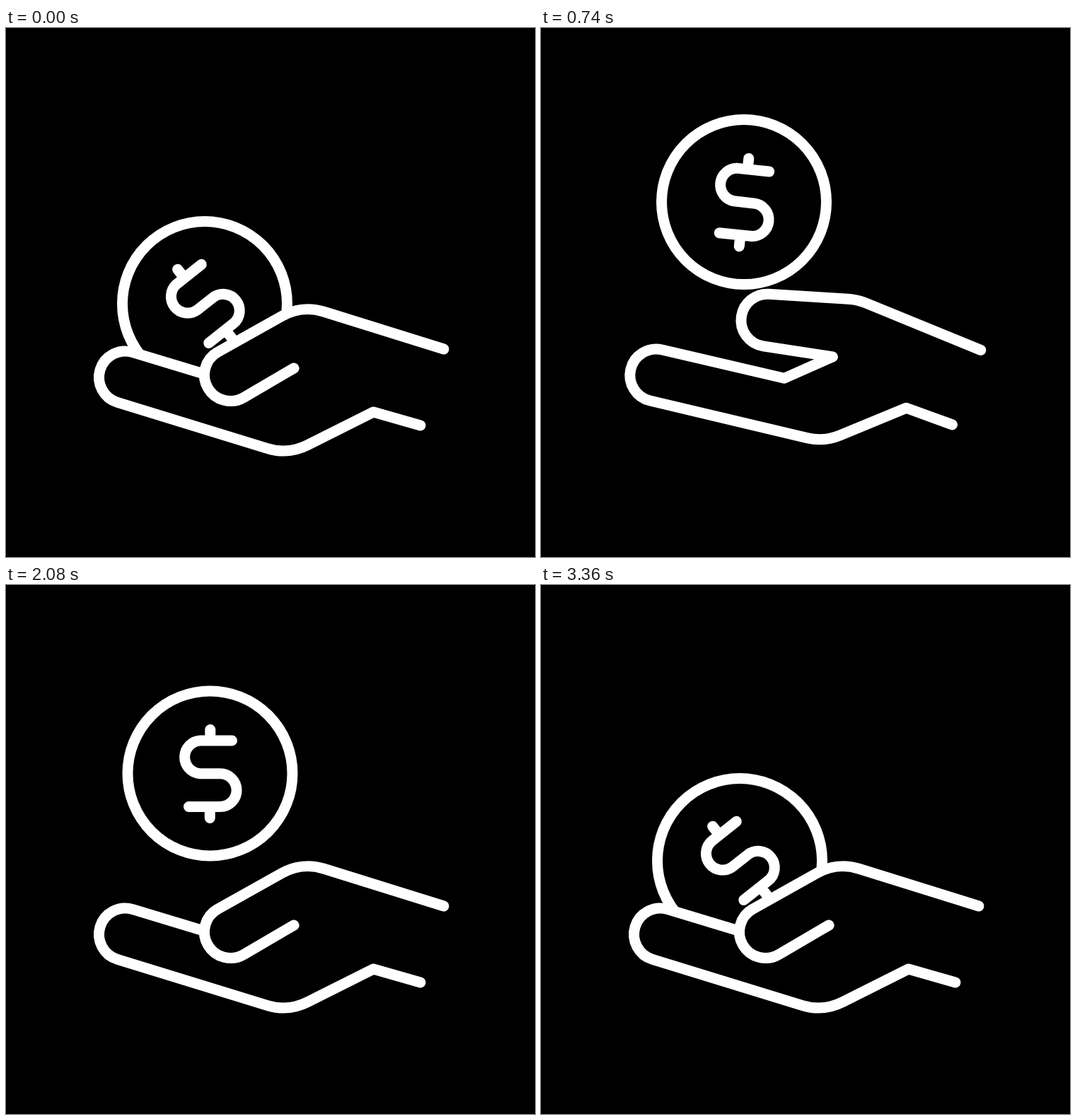
An HTML page with a canvas for the animation above (3580 ms loop, 748 by 748 pixels).

```html
<!DOCTYPE html>
<html>
<head>
<meta charset="utf-8">
<style>
  html, body { margin: 0; height: 100%; overflow: hidden; background: #000; }
  canvas { display: block; }
</style>
</head>
<body>
<canvas id="stage" width="748" height="748"></canvas>
<script>
const ctx = document.getElementById('stage').getContext('2d');
const LOOP = 3580, FINGER = 37, BEND = 76;
const dollar = new Path2D('M31-46.5H-14A23.4 23.4 0 0 0-14 .2L14.3 .4A23.3 23.3 0 0 1 14.3 47H-30M.3-62V-46.5M-.2 47V63');

// Progress from 0 to 1 between two times: a cubic Bezier easing with flat ends
function ease(t, from, to, x1 = 1 / 3, x2 = 2 / 3) {
  const p = Math.min(1, Math.max(0, (t - from) / (to - from)));
  let lo = 0, hi = 1, s;
  for (let i = 0; i < 24; i++) {
    s = (lo + hi) / 2;
    const x = 3 * (1 - s) * s * ((1 - s) * x1 + s * x2) + s ** 3;
    if (x < p) lo = s; else hi = s;
  }
  return s * s * (3 - 2 * s);
}

// Rises to 1 between a and b, falls back between c and d
const pulse = (t, a, b, c, d) => ease(t, a, b) - ease(t, c, d);

function rotate([x, y], [px, py], angle, scale = 1) {
  const c = Math.cos(angle) * scale, s = Math.sin(angle) * scale;
  return [px + (x - px) * c - (y - py) * s, py + (x - px) * s + (y - py) * c];
}

// Arc around c, tangent to the lines from one point and to another
function hook(c, from, to, dir) {
  const angle = (p, side) => {
    const dx = p[0] - c[0], dy = p[1] - c[1];
    return Math.atan2(dy, dx) + side * Math.acos(FINGER / Math.hypot(dx, dy));
  };
  ctx.arc(...c, FINGER, angle(from, dir), angle(to, -dir), dir < 0);
}

function drawCoin(t) {
  const toss = ease(t, 0, 700);
  const settle = ease(t, 700, 2170, .28, .13);
  const drop = ease(t, 2185, 3240, .985, .55);
  const turn = 44.5 * toss - 6 * settle - 38.5 * drop - 38.5;
  ctx.save();
  ctx.translate(281 + 6 * toss + 1.5 * settle - 7.5 * drop,
    390 - 144 * toss + 20.5 * settle + 123.5 * drop);
  ctx.beginPath();
  ctx.arc(0, 0, 116.5, 0, 2 * Math.PI);
  ctx.stroke();
  ctx.rotate(turn * Math.PI / 180);
  ctx.stroke(dollar);
  ctx.restore();
}

function drawHand(t) {
  // The whole hand tilts at the wrist; fingers curl and the thumb swings on top of that
  const tilt = .07 * pulse(t, 140, 460, 740, 1250) - .0128 * pulse(t, 0, 140, 140, 460)
    + .0232 * pulse(t, 2600, 2780, 2780, 3120) - .0104 * pulse(t, 2780, 3120, 3120, 3360);
  const curl = .135 * pulse(t, 160, 560, 740, 1250);
  const swing = .537 * pulse(t, 120, 540, 740, 1250);

  const arm = (x, y) => rotate([x, y], [600, 497], tilt);
  const palm = (x, y) => arm(...rotate([x, y], [370, 545], -curl));
  const thumb = (x, y, share = 1, stretch = 0) =>
    arm(...rotate([x, y], [414, 486], swing * share, 1 + stretch * swing ** 2));

  const tip = thumb(407, 481), pad = thumb(317.5, 490.5, 1, .57);
  const knuckle = thumb(418.5, 391.5, .42), sleeve = arm(619, 454);
  const corner = palm(349, 510), finger = palm(168.5, 494), heel = palm(399, 603.5);
  const wrist = arm(519.5, 543), cuff = arm(586, 562);
  const paint = () => { ctx.fill(); ctx.stroke(); };

  ctx.beginPath();
  ctx.moveTo(...tip);
  ctx.lineTo(...corner);
  hook(finger, corner, heel, -1);
  ctx.arcTo(...heel, ...wrist, BEND);
  ctx.lineTo(...wrist);
  ctx.lineTo(...cuff);
  paint();

  ctx.beginPath();
  ctx.moveTo(...tip);
  hook(pad, tip, knuckle, 1);
  ctx.arcTo(...knuckle, ...sleeve, BEND);
  ctx.lineTo(...sleeve);
  paint();
}

ctx.fillStyle = '#000';
ctx.strokeStyle = '#fff';
ctx.lineWidth = 15;
ctx.lineCap = ctx.lineJoin = 'round';

const start = performance.now();
function frame() {
  const t = (performance.now() - start) % LOOP;
  ctx.fillRect(0, 0, 748, 748);
  drawCoin(t);
  drawHand(t);
  requestAnimationFrame(frame);
}
frame();
</script>
</body>
</html>
```
